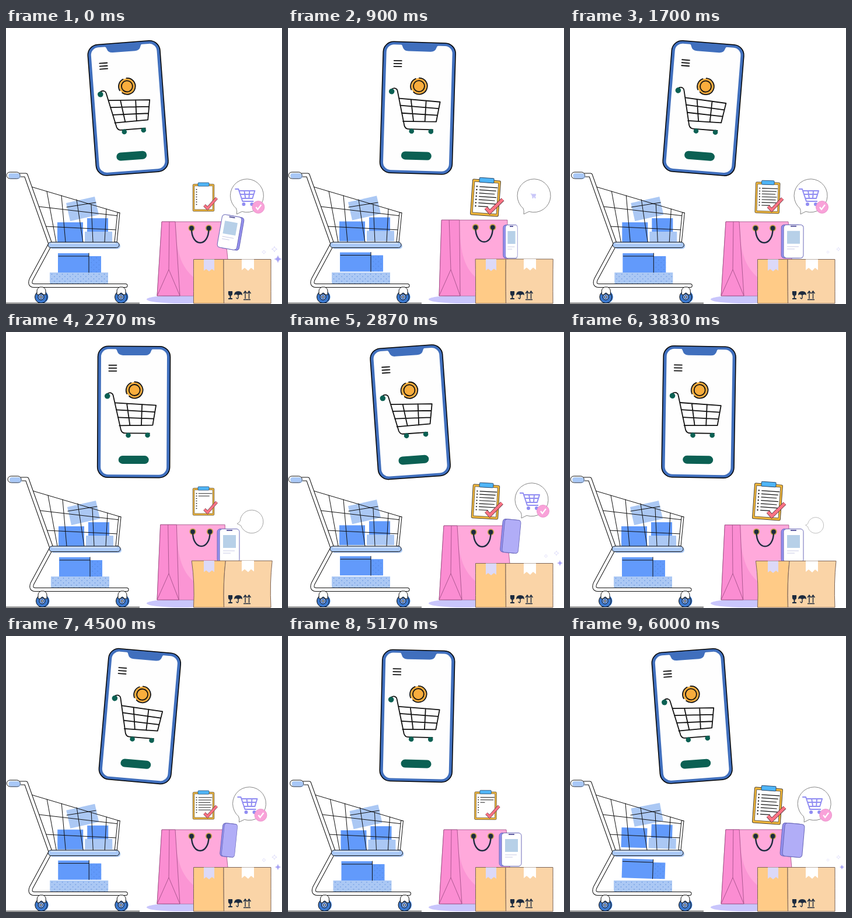
An HTML page that plays this animation: 473x473 px, repeating every 6.03 s.

```html
<!DOCTYPE html>
<html lang="en">
<head>
<meta charset="utf-8">
<title>Online shopping</title>
<style>
html, body { margin: 0; width: 100%; height: 100%; overflow: hidden; background: #fff; }
svg { display: block; width: 100vw; height: 100vh; }
.line { fill: none; stroke: #111; stroke-linecap: round; stroke-linejoin: round; }
.thin { stroke: #111; stroke-width: 1; }
.ink { stroke-width: 1.8; }
.white { stroke: #fff; }
.check { fill: none; stroke: #fb7384; stroke-width: 5; }
.check.rim { stroke: #5d3440; stroke-width: 6.6; }
</style>
</head>
<body>
<svg viewBox="0 0 473 473">
  <defs>
    <pattern id="dots" width="9" height="8" patternUnits="userSpaceOnUse">
      <circle cx="2" cy="2" r=".7" fill="#4a7fd6"/><circle cx="6.5" cy="6" r=".7" fill="#4a7fd6"/>
    </pattern>
    <g id="wheel">
      <circle cx="2" r="10.5" fill="#3a78cf"/>
      <circle r="10.5" fill="#3a78cf" class="thin"/>
      <path d="M-7-4V-10Q-7-15-2-17H3Q8-15 8-10V-4H4Q0-10-3-4Z" fill="#fff" class="thin"/>
      <circle r="5" fill="#7fa9ee" class="thin"/><circle r="1.8" fill="#fff" class="thin"/>
    </g>
    <path id="frame" d="M24 252H34L76 370L43 431Q39 441 48 441.5H205"/>
    <path id="tick" d="M2 17.6L9 24.5L29.7 1.2"/>
    <path id="spark" d="M0-6Q1-1 6 0Q1 1 0 6Q-1 1-6 0Q-1-1 0-6Z"/>
    <path id="arrow" d="M-3 4L0 0L3 4M0 1V13"/>
  </defs>

  <!-- Large phone -->
  <g id="phone">
    <rect x="-62" y="-112.5" width="124" height="225" rx="18" fill="#406fbd" stroke="#000" stroke-width="1.5"/>
    <rect x="-56.5" y="-107.5" width="113" height="215" rx="13" fill="#fefefe"/>
    <path d="M-34-109H34Q30-108 29-104Q27-97 19-97H-19Q-27-97-29-104Q-30-108-34-109Z" fill="#406fbd"/>
    <circle cx="1" cy="-37.5" r="13.5" fill="#f9ad3d"/>
    <g class="line ink">
      <path d="M-43-80h13m-13 5h13m-13 5h13"/>
      <path d="M1-51.5A14 14 0 1 1-8-27M-12-31A14 14 0 0 1-5-50"/>
      <circle cx="1" cy="-37.5" r="9.5"/>
      <path d="M-47-30Q-42-34-38.5-32Q-36-31-35.5-28L-22 31Q-20 36.5-15 36.5H27"/>
      <path d="M-32-15.5L38-11.5L32.4 22.5L-24.6 23.5M-30-3.5L36 0M-27 9.5L34 11.5M-12-14L-6.6 23M14-13L13 23"/>
    </g>
    <g fill="#0b6053">
      <circle cx="-45.5" cy="-27" r="4.8"/><circle cx="-9.4" cy="40" r="4.3"/><circle cx="23.7" cy="39.6" r="4.3"/>
      <rect x="-26" y="75" width="52" height="14" rx="7"/>
    </g>
  </g>

  <!-- Shopping cart -->
  <path class="thin" d="M0 471.5H229"/>
  <g id="cart">
    <g id="upper">
      <path d="M103 300L152 289L159 320L110 331Z" fill="#abc8f4"/>
      <path d="M88 333H132V367H88ZM139 326H175V350H139Z" fill="#629afb"/>
      <path d="M135 349H182V367H135Z" fill="#abc8f4"/>
    </g>
    <path d="M75 419H175V439H75Z" fill="#abc8f4"/><path d="M75 419H175V439H75Z" fill="url(#dots)"/>
    <g id="lower">
      <path d="M89 386H142V419H89ZM142 391H163V419H142Z" fill="#629afb"/>
      <path d="M142 391H163V419H142Z" fill="url(#dots)"/>
      <path class="line" d="M90 391H142M142 386V419"/>
    </g>
    <g class="line">
      <path d="M43 272L195 317M56 306L193 322M67 340L191 346M104 307L154 299"/>
      <path d="M70 280L86 367M95 287L102 367M121 294L132 367M146 302L149 367M172 310L169 367"/>
      <path d="M195 317L190 367H186L191 317Z" fill="#fff"/>
      <use href="#frame" stroke-width="7"/><use href="#frame" class="white" stroke-width="5"/>
    </g>
    <rect x="4" y="249" width="21" height="10" rx="5" fill="#a9c8f7"/>
    <rect x="1" y="247" width="23" height="11" rx="5.5" fill="#fff" class="thin"/>
    <rect x="4" y="249" width="19.5" height="8.5" rx="4" fill="#a9c8f7"/>
    <rect x="75" y="369" width="121" height="9.5" rx="4.7" fill="#a9c8f7"/>
    <rect x="72" y="367" width="122" height="9.5" rx="4.7" fill="#a9c8f7" class="thin"/>
    <path class="line white" d="M77 369H188"/>
    <use href="#wheel" x="60" y="461"/><use href="#wheel" x="197" y="461"/>
  </g>

  <!-- Bag -->
  <ellipse cx="300" cy="465" rx="59" ry="7" fill="#c9c6fc"/>
  <g stroke="#9b4b82" stroke-width=".8">
    <path id="bag" fill="#ffa9db"/>
    <path id="shade" fill="#fb95d4" stroke="none"/>
    <path id="side" fill="#fb8dd2"/>
    <path id="crease" fill="none"/>
  </g>
  <g id="grip" fill="#1d2b3f">
    <g stroke="#c7a24d" stroke-width="1.8"><circle cx="318" cy="343" r="4.8"/><circle cx="347.5" cy="343" r="4.8"/></g>
    <path d="M318 344C318 376 347.500 376 347.500 344" fill="none" stroke="#1d2b3f" stroke-width="2.4"/>
  </g>

  <!-- Small phone -->
  <g id="mobile" stroke="#6a68b8">
    <rect id="edge" y="-28.5" height="57" rx="5" fill="#9490ee"/>
    <g id="face">
      <rect id="shell" x="-17" y="-28.5" width="34" height="57" rx="5"/>
      <g id="screen" stroke="none">
        <rect x="-11" y="-18" width="22" height="22" fill="#b7d0e8"/>
        <path d="M-11 9H9M-11 13H2" stroke="#c9cbe6"/><path d="M-5-26H5" stroke="#5c5aa0" stroke-width="2"/>
      </g>
    </g>
  </g>

  <!-- Parcels -->
  <g stroke="#7d6557"><path id="box1" fill="#ffcb87"/><path id="box2" fill="#fad4a7"/></g>
  <g id="tape">
    <path d="M339 396.5H357V416L353 413L348 417L343 413L339 416Z" fill="#dcd9f8"/>
    <path d="M404 396.5H425V415L420 411L415 416L409 411L404 415Z" fill="#fff"/>
  </g>
  <g fill="#1d2b3f">
    <path d="M381 451H388Q389 458 385.500 459V463H388V465H381V463H383.500V459Q380 458 381 451Z"/>
    <path d="M391 458Q391 451 398 451Q405 451 405 458L402 456.500L398 458L394 456.500Z"/>
    <g fill="none" stroke="#1d2b3f" stroke-width="1.4">
      <path d="M398 456V462Q397 466 394.500 462M407 465.500H419"/>
      <use href="#arrow" x="410" y="451"/><use href="#arrow" x="416.500" y="451"/>
    </g>
  </g>

  <!-- Clipboard -->
  <g id="clip">
    <rect x="-24" y="-30" width="48" height="61" rx="2" fill="#f2b83b" stroke="#4f4330"/>
    <rect x="-20.5" y="-26" width="41" height="53" fill="#fff" stroke="#4f4330" stroke-width=".8"/>
    <rect x="-12.5" y="-33.500" width="25" height="8" rx="1.5" fill="#4fb5f7" stroke="#2b4c70"/>
    <g id="rows" class="line"></g>
    <use href="#tick" class="check rim"/><use href="#tick" class="check"/>
  </g>

  <!-- Speech bubble -->
  <path id="bubble" d="M-25 13A28.500 28.500 0 1 1-8 27.500L-17 32Q-16 26-18 22Q-22 19-25 13Z" fill="#fff" stroke="#777" stroke-width=".9"/>
  <g id="order" fill="none" stroke="#918df2" stroke-width="2" stroke-linejoin="round">
    <path d="M-20-11H-14L-7 10H12M-13-8H14L10 5H-8M-11-2H12M-4-8L-2 5M5-8L4 5"/>
    <circle cx="-5" cy="15" r="2" fill="#918df2"/><circle cx="9" cy="15" r="2" fill="#918df2"/>
  </g>
  <g id="badge" stroke="#e58cc6" stroke-width=".8">
    <circle r="10.5" fill="#f9a2d9"/><path d="M-4 0L-1 4L5-4" fill="none" stroke="#fff" stroke-width="2.2"/>
  </g>
  <g id="sparks" stroke="#c3c0f5" stroke-width=".8">
    <use href="#spark" id="spark0" fill="#fff"/><use href="#spark" id="spark1" fill="#fff"/><use href="#spark" id="spark2" fill="#a5a0f5"/>
  </g>
</svg>
<script>
const LOOP = 6030, SWING = LOOP / 2, SCENE = 1600, NOTE = 2460, ROWS = 7;
const $ = id => document.getElementById(id);
const set = (id, attr, value) => $(id).setAttribute(attr, value);
const place = (id, x, y, scale = 1, turn = 0) =>
  set(id, 'transform', `translate(${x} ${y}) rotate(${turn}) scale(${scale})`);

const ramp = (t, from, to) => Math.min(1, Math.max(0, (t - from) / (to - from)));
const ease = (t, from, to) => { const u = ramp(t, from, to); return u * u * (3 - 2 * u); };
const show = (t, inStart, inEnd, outStart, outEnd) => ease(t, inStart, inEnd) - ease(t, outStart, outEnd);
const pulse = (t, mid, reach) => Math.cos(Math.PI / 2 * Math.min(1, Math.abs(t - mid) / reach)) ** 2;

const rowY = i => i * 5.6 - 18;
const rowLength = i => i < ROWS - 1 ? 30 - i * 7 % 5 : 16;
for (let i = 0; i < ROWS; i++)
  $('rows').innerHTML += `<circle cx="-16" cy="${rowY(i)}" r=".7"/><path id="row${i}" stroke-width="1.2"/>`;

function drawSwing(t) {
  const angle = .35 - 4.6 * Math.cos(2 * Math.PI * t / SWING);
  set('phone', 'transform', `rotate(${angle} 218 263) translate(218.5 137)`);
}

function drawCart(t, s) {
  place('cart', 2.6 * pulse(t % SWING, 2050, 700), 0);
  const hop = pulse(t, SWING + 45, 200) + pulse(t, LOOP + 45, 200);
  const lift = -2.5 * pulse(s, 690, 450) - 2 * hop;
  set('upper', 'transform', `translate(0 ${lift}) rotate(${2.5 * hop} 135 350)`);
  set('lower', 'transform', `translate(0 ${lift}) rotate(${2.5 * hop} 126 405)`);
}

function drawBag(s) {
  const b = pulse(s, 450, 400);
  const left = 267 - 4 * b, top = 332 - 3 * b, fold = left + 23 + 8 * b, foot = 298 - 3 * b;
  set('bag', 'd', `M${left} ${top}H${374 + 2 * b}L${380 - 4 * b} 396V459H259Z`);
  set('shade', 'd', `M${fold} ${top}C${fold} 390 305 415 325 430V458.5H${foot}Z`);
  set('side', 'd', `M${left} ${top}H${fold}L${foot} 459H259Z`);
  set('crease', 'd', `M${left + 13} ${top}L279 414L259 459M279 414L${foot} 459`);
  place('grip', 3.5 * b, -1.5 * b);
}

function drawParcels(s) {
  const b = 1.1 * pulse(s, 280, 280);
  const top = 396.5 - 4 * b, mid = 373 + 3 * b, left = 321.5 - 3 * b, right = 454 + 2 * b;
  const fold = `Q${373 - b} 430 `;
  set('box1', 'd', `M${left} ${top}H${mid}${fold}373.5 472H321.5Q${321.5 + 2 * b} 430 ${left} ${top}Z`);
  set('box2', 'd', `M${mid} ${top}H${right}Q${454 - 2 * b} 430 454 472H373.5${fold}${mid} ${top}Z`);
  place('tape', 0, -4 * b);
}

function drawMobile(s) {
  const up = show(s, 500, 780, 1200, 1310), late = ease(s, 800, 1200);
  const c = Math.cos(2 * Math.PI * ramp(s, 380, 1200)), width = Math.max(.05, Math.abs(c));
  const back = c < 0;
  place('mobile', 383, 366 - 16 * up, 1, up * (5 + 5 * late));
  set('edge', 'x', -17 * width - 4 + 8 * late * up);
  set('edge', 'width', 34 * width);
  set('face', 'transform', `scale(${width} 1)`);
  set('shell', 'fill', back ? '#b1adf7' : '#fff');
  set('screen', 'visibility', back ? 'hidden' : 'visible');
}

function drawBubble(s) {
  const pop = (from, to) => show(s, from, to, 1310, 1480);
  const below = 1 - ease(s, 230, 400), size = pop(100, 370);
  const x = 421 - 9 * ease(s, 500, 1300), y = 287 + 44 * below;
  place('bubble', x, y, size, 62 * below);
  place('order', x, y, pop(410, 680));
  place('badge', x + 20, y + 20, pop(600, 750));
  place('spark0', 442, 384, .55 * show(s, 450, 1000, 1200, 1480));
  place('spark1', 460, 379, .75 * show(s, 450, 1000, 1200, 1480));
  place('spark2', 466, 396, show(s, 400, 1100, 1200, 1290));
}

function drawClip(t) {
  const grown = show(t, 200, 500, 1350, 2000);
  const drawn = show(t, 150, 410, 1900, NOTE);
  place('clip', 338.5, 290.5, .76 + .24 * grown, 4 * grown);
  for (let i = 0; i < ROWS; i++) {
    const part = ramp(drawn * ROWS, i, i + 1);
    set('row' + i, 'd', part ? `M-11 ${rowY(i)}h${rowLength(i) * part}` : '');
  }
}

function frame() {
  const t = performance.now() % LOOP;
  const s = (t + 1200) % SCENE; // the scene is at rest when s is 0
  drawSwing(t);
  drawCart(t, s);
  drawBag(s);
  drawParcels(s);
  drawMobile(s);
  drawBubble(s);
  drawClip(t % NOTE);
  requestAnimationFrame(frame);
}
frame();
</script>
</body>
</html>
```
